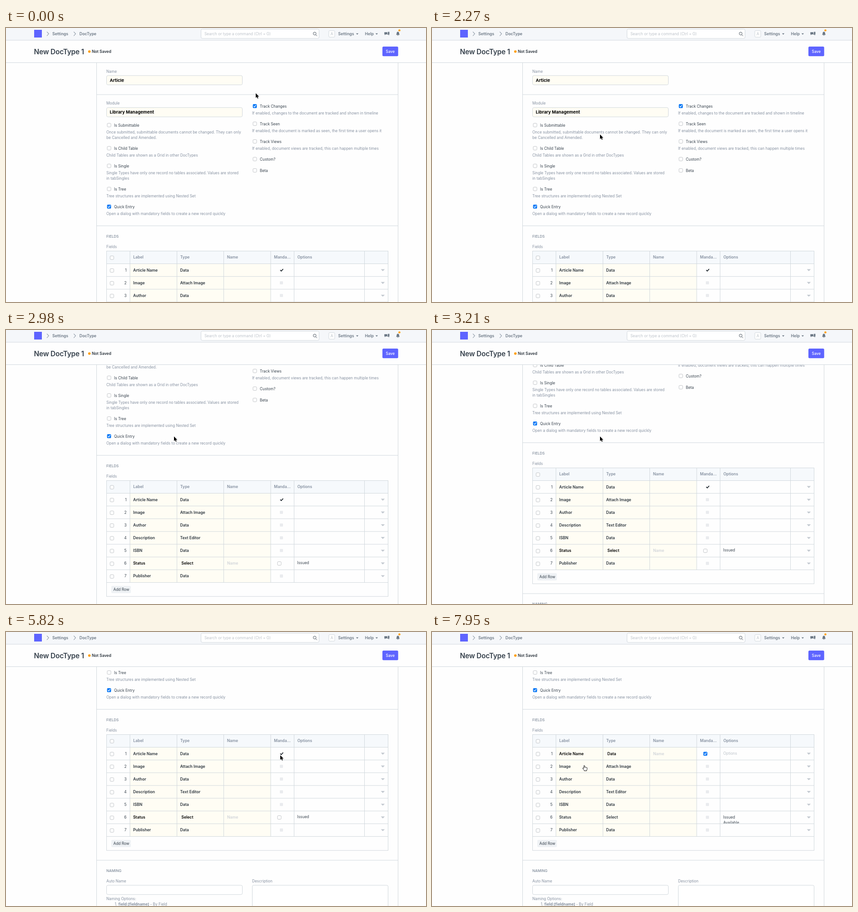
Animation, 925 px wide and 605 px high, one loop 8 s. Source, as an HTML page:

```html
<!DOCTYPE html>
<html lang="en">
<head>
<meta charset="utf-8">
<title>New DocType</title>
<style>
  html, body { margin: 0; width: 100%; height: 100%; overflow: hidden; background: #fefefe; }
  svg { display: block; width: 100%; height: 100%; font-family: Inter, "Open Sans", sans-serif; }
  text { white-space: pre; font-size: 8.3px; fill: #36414c; }
  .muted { fill: #8590a0; }
  .nav { font-size: 8.8px; font-weight: 600; fill: #6c7885; }
  .cell { font-size: 8.65px; font-weight: 600; fill: #2b343d; }
  .head { font-size: 8.65px; font-weight: 600; fill: #8590a0; }
  .edit { font-size: 8.65px; font-weight: 600; fill: #000; }
  .ghost { font-size: 8.65px; font-weight: 600; fill: #d0d4d9; }
  .hint { fill: #bcc2c9; }
  .value { font-size: 9.6px; font-weight: 700; fill: #000; }
  .section { font-size: 8px; font-weight: 500; fill: #7c8897; }
</style>
</head>
<body>
<svg id="stage" viewBox="0 0 925 605" xmlns="http://www.w3.org/2000/svg"></svg>
<script>
const LOOP = 8000;
const LINE = '#d1d8dd', CREAM = '#fffdf4', PURPLE = '#5e64ff', ORANGE = '#ffa00a';
const TABLE_TOP = 492.5, ROWS_TOP = 520.5, PITCH = 28.14;

// y is the middle of the text line
const text = (x, y, str, cls = '', extra = '') =>
  `<text x="${x}" y="${y + 3.1}" class="${cls}" ${extra}>${str}</text>`;
const rect = (x, y, w, h, fill, extra = '') =>
  `<rect x="${x}" y="${y}" width="${w}" height="${h}" fill="${fill}" ${extra}/>`;
const path = (d, extra) => `<path d="${d}" ${extra}/>`;
const line = d => path(d, `fill="none" stroke="${LINE}"`);
const field = (x, y, w, h, fill) => rect(x, y, w, h, fill, `rx="3" stroke="${LINE}"`);

function checkbox(x, y, on) {
  if (!on) return rect(x - 4, y - 4, 8, 8, '#fff', 'rx="1.8" stroke="#b3b6ba" stroke-width=".8"');
  return rect(x - 4.4, y - 4.4, 8.8, 8.8, '#0a78f5', 'rx="1.9"') +
    path(`M${x - 2.2} ${y + .2}l1.6 1.9 2.9-4.2`,
      'fill="none" stroke="#fff" stroke-width="1.2" stroke-linecap="round" stroke-linejoin="round"');
}

function option(x, y, label, on, ...help) {
  return checkbox(x + 6, y - .6, on) + text(x + 17, y, label) +
    help.map((h, i) => text(x, y + 15 + i * 12, h, 'muted')).join('');
}

function rowStatic(y, label, type, required, options) {
  const mark = required
    ? path(`M604 ${y}l2.2 2.3 4.2-4.6`, 'fill="none" stroke="#1f272e" stroke-width="1.7"')
    : rect(603.2, y - 3.4, 6.8, 6.8, '#e9ebee', 'rx="1"');
  return text(280, y, label, 'cell') + text(383.5, y, type, 'cell') + mark +
    options.map((o, i) => text(641.5, y + i * 12, o)).join('');
}

function rowEdit(y, label, type, box, options, hint) {
  return text(280, y, label, 'edit') + text(386.3, y, type, 'edit') +
    text(487, y, 'Name', 'ghost') + box + text(641.5, y - 1, options, hint);
}

function table() {
  const cols = [273, 376.5, 479.5, 583, 634.5, 789.5];
  const heads = ['Label', 'Type', 'Name', 'Manda...', 'Options'];
  const rows = [['Article Name', 'Data'], ['Image', 'Attach Image'], ['Author', 'Data'],
    ['Description', 'Text Editor'], ['ISBN', 'Data'], ['Status', 'Select'], ['Publisher', 'Data']];
  const bottom = ROWS_TOP + rows.length * PITCH;
  let out = rect(221.5, TABLE_TOP, 620, 28, '#f6f9fc') +
    rect(273, ROWS_TOP, 310, bottom - ROWS_TOP, CREAM) + checkbox(233.3, 507.2) +
    heads.map((h, i) => text(cols[i] + 7.2, 506.2, h, 'head')).join('');
  rows.forEach(([label, type], i) => {
    const top = ROWS_TOP + i * PITCH, y = top + 13.9;
    out += line(`M221.5 ${top}H841.5`) + checkbox(233.3, y + 1) +
      text(265.5, y, i + 1, '', 'text-anchor="end"') +
      path(`M825.6 ${y - 1.8}h8.6l-4.3 4.4z`, 'fill="#c3c9d0"');
    if (i === 0) {
      const boxes = `<g id="boxOn">${checkbox(602, y + .4, true)}</g><g id="boxOff">${checkbox(602, y + .4)}</g>`;
      out += `<g id="first">${rowStatic(y, label, type, true, [])}</g>` +
        `<g id="firstEdit">${rowEdit(y, label, type, boxes, 'Options', 'hint')}</g>`;
    } else if (i === 5) {
      out += `<clipPath id="cut">${rect(221, top, 621, PITCH - .5, '#000')}</clipPath>` +
        `<g id="status" clip-path="url(#cut)">${rowStatic(y, label, type, false, ['Issued', 'Available'])}</g>` +
        `<g id="statusEdit">${rowEdit(y, label, type, checkbox(602, y + .4), 'Issued', '')}</g>`;
    } else out += rowStatic(y, label, type, false, []);
  });
  return out + line(cols.map(x => `M${x} ${TABLE_TOP}V${bottom}`).join('')) +
    line(`M221.5 ${bottom}H841.5`) +
    rect(221.5, TABLE_TOP, 620, 255.8, 'none', `stroke="${LINE}"`) +
    rect(232, 725, 43, 16, '#eff2f5', 'rx="2"') + text(236.5, 733, 'Add Row');
}

function form() {
  return line('M199.5 0V900M863.5 0V900M199.5 147H863.5M199.5 436.8H863.5M199.5 770H863.5') +
    text(221, 95.5, 'Name', 'muted') + field(221.5, 105, 299, 20.5, CREAM) +
    text(228.6, 115.6, 'Article', 'value') +
    text(221, 166.3, 'Module', 'muted') + field(221.5, 175.7, 299, 20.5, CREAM) +
    text(228.6, 186.3, 'Library Management', 'value') +
    option(221, 215, 'Is Submittable', false,
      'Once submitted, submittable documents cannot be changed. They can only', 'be Cancelled and Amended.') +
    option(221, 266, 'Is Child Table', false, 'Child Tables are shown as a Grid in other DocTypes') +
    option(221, 305, 'Is Single', false,
      'Single Types have only one record no tables associated. Values are stored', 'in tabSingles') +
    option(221, 356, 'Is Tree', false, 'Tree structures are implemented using Nested Set') +
    option(221, 395, 'Quick Entry', true, 'Open a dialog with mandatory fields to create a new record quickly') +
    option(542, 173, 'Track Changes', true, 'If enabled, changes to the document are tracked and shown in timeline') +
    option(542, 212, 'Track Seen', false, 'If enabled, the document is marked as seen, the first time a user opens it') +
    option(542, 251, 'Track Views', false, 'If enabled, document views are tracked, this can happen multiple times') +
    option(542, 290, 'Custom?', false) + option(542, 315, 'Beta', false) +
    text(221, 460.3, 'FIELDS', 'section') + text(221, 483, 'Fields', 'muted') + table() +
    text(221, 793, 'NAMING', 'section') + text(221, 816, 'Auto Name', 'muted') +
    field(221.5, 825.2, 299, 20.5, '#fff') + text(542, 816, 'Description', 'muted') +
    field(542.5, 825.2, 299, 80, '#fff') + text(221, 854.5, 'Naming Options:', 'muted') +
    text(239.5, 866.7, '1. <tspan font-weight="700">field:[fieldname]</tspan> - By Field', 'muted');
}

function header() {
  const chevron = x => path(`M${x} 8.3l4.2 4.5-4.2 4.5`, 'fill="none" stroke="#8d99a6" stroke-width="1.1"');
  const caret = x => path(`M${x} 11.8h5.2l-2.6 2.9z`, 'fill="#6c7885"');
  return rect(0, 0, 925, 77, '#fefefe') + rect(0, 0, 925, 27, '#f5f7fa') +
    line('M0 27H925M0 76.5H925') +
    rect(62, 4, 17, 17, PURPLE) +
    chevron(90) + text(102, 13, 'Settings', 'nav') + chevron(149.2) + text(161.8, 13, 'DocType', 'nav') +
    field(429.5, 2.5, 260, 20.5, '#fff') +
    text(437, 13, 'Search or type a command (Ctrl + G)', 'hint', 'style="font-size:8.4px"') +
    path('M682.2 14.8l2.9 3M683 12.3a3.2 3.2 0 1 1-6.4 0a3.2 3.2 0 1 1 6.4 0', 'fill="none" stroke="#4c5661" stroke-width="1"') +
    rect(711, 5.8, 13, 14.4, '#fff', `rx="2" stroke="${LINE}"`) +
    text(717.5, 13, 'A', 'hint', 'text-anchor="middle"') +
    text(731.5, 13, 'Settings', 'nav') + caret(771) + text(790.5, 13, 'Help', 'nav') + caret(813.8) +
    path('M833.3 9.2h6.6v4.8h-3.6l-2 2v-2h-1zM841 8.4h3.4v5.8h-.9v2.2l-2.2-2.2h-2.6v-.9h2.3z', 'fill="#6c7885"') +
    path('M859 15.2q1.4-1.1 1.4-3.6q0-3 2.7-3.3q2.7.3 2.7 3.3q0 2.5 1.4 3.6zM861.9 15.8h2.4q-.2 1.2-1.2 1.2t-1.2-1.2z', 'fill="#6c7885"') +
    `<circle cx="866.4" cy="5.2" r="2.3" fill="${ORANGE}"/>` +
    text(61.5, 54.5, 'New DocType 1', '', 'style="font-size:15.4px;font-weight:600;letter-spacing:-.2px"') +
    `<circle cx="183.6" cy="52" r="2.8" fill="${ORANGE}"/>` +
    text(189, 52, 'Not Saved', 'cell') +
    rect(829, 41, 34.7, 21.3, PURPLE, 'rx="2.5"') +
    text(846.3, 51.7, 'Save', '', 'text-anchor="middle" style="fill:#fff;font-weight:500"');
}

const cursors =
  path('M0 0V10.2L2.3 8.1 4 11.8 5.7 11 4.1 7.5H7.3Z',
    'id="arrow" fill="#000" stroke="#fff" stroke-width=".8" paint-order="stroke"') +
  path('M3.4 7.2V1.6a1 1 0 0 1 2 0V5q.2-.7 1-.7t1 .9q.2-.6.9-.6t.9 1q.3-.5.8-.4t.6 1V8.5q0 1.5-1 2.5v1.5H4.2V11.3L.9 7.6q-.5-.8.2-1.3t1.3.2Z',
    'id="hand" fill="#fff" stroke="#000" stroke-width=".9"') +
  path('M0 .5q2 0 2.3 1.2Q2.600 .5 4.600 .5M0 11.500q2 0 2.300-1.200q.3 1.200 2.300 1.200M2.300 1.700v8.600',
    'id="beam" fill="none" stroke="#333" stroke-width=".9"');

document.getElementById('stage').innerHTML =
  `<g id="form">${form()}</g>${header()}<g id="cursor">${cursors}</g>`;
const el = id => document.getElementById(id);
const show = (id, on) => el(id).setAttribute('display', on ? 'inline' : 'none');

// step, x, y, shape
const route = [
  [-2, 550, 144, 'arrow'], [-1, 526, 145, 'arrow'], [0, 490, 140, 'arrow'], [2, 380, 118, 'beam'],
  [4, 290, 111, 'beam'], [6, 254, 116, 'beam'], [7, 251, 168, 'beam'], [8, 249, 176, 'beam'],
  [10, 262, 188, 'beam'], [12, 300, 184, 'beam'], [14, 346, 174, 'beam'], [15, 362, 205, 'arrow'],
  [16, 370, 235, 'arrow'], [26, 370, 235, 'arrow'], [30, 376, 268, 'hand'], [31, 304, 270, 'hand'],
  [32, 313, 267, 'hand'], [34, 386, 267, 'hand'], [36, 386, 267, 'hand'], [37, 400, 267, 'hand'],
  [40, 500, 270, 'hand'], [42, 610, 275, 'arrow'], [43, 616, 272, 'arrow'], [46, 604, 272, 'arrow'],
  [50, 599, 270.5, 'arrow'], [51, 600.5, 271.5, 'arrow'], [55, 600.5, 271.5, 'arrow'],
  [56, 612, 275, 'arrow'], [57, 610, 285, 'arrow'], [59, 520, 294, 'hand'], [62, 387, 293, 'hand'],
  [63, 352, 291, 'hand'], [64, 331, 294, 'hand']
];
// step, offset
const scroll = [[18, 0], [19, 18], [20, 63.4], [21, 118], [22, 160], [23, 160], [24, 188],
  [25, 222], [26, 246], [27, 259], [28, 266]];

function along(keys, n) {
  let i = keys.findLastIndex(k => k[0] <= n);
  if (i < 0) return keys[0];
  const a = keys[i], b = keys[i + 1];
  if (!b) return a;
  const u = (n - a[0]) / (b[0] - a[0]);
  return a.map((v, j) => typeof v === 'number' ? v + (b[j] - v) * u : v);
}

const stepAt = t => t < 240 ? -2 : t < 390 ? -1 : Math.floor((t - 375) / 118.1);

function draw(t) {
  const n = stepAt(t);
  const [, x, y, shape] = along(route, n);
  el('form').setAttribute('transform', `translate(0 ${-along(scroll, n)[1]})`);
  el('cursor').setAttribute('transform', `translate(${x} ${y})`);
  ['arrow', 'hand', 'beam'].forEach(id => show(id, id === shape));
  const opened = n >= 48, off = n >= 50 && n < 53;
  show('first', !opened);
  show('firstEdit', opened);
  show('status', opened);
  show('statusEdit', !opened);
  show('boxOn', !off);
  show('boxOff', off);
}

const start = performance.now();
function frame() {
  draw((performance.now() - start) % LOOP);
  requestAnimationFrame(frame);
}
frame();
</script>
</body>
</html>
```
